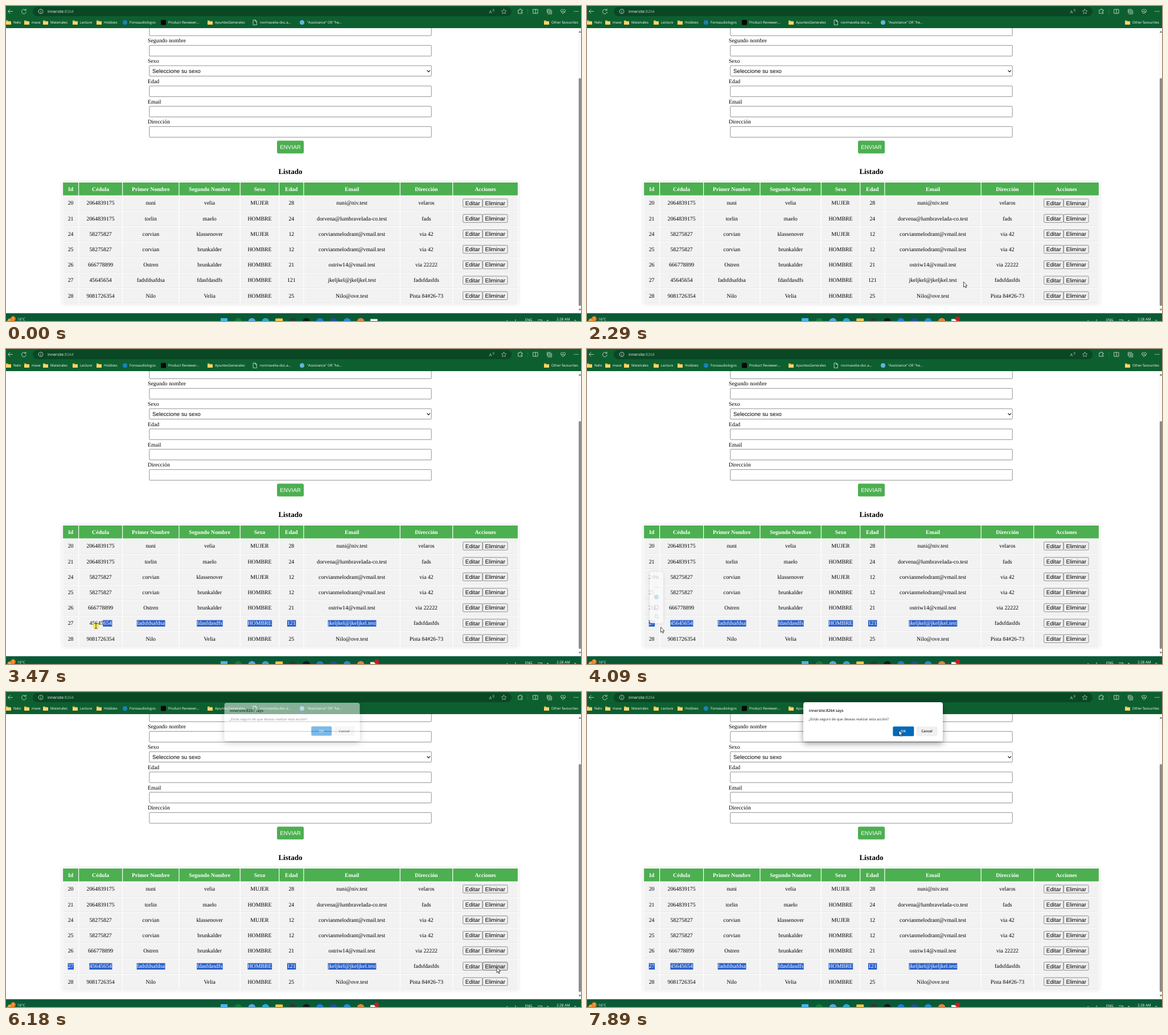
An HTML page for the animation above (8 s loop, 1010x555 px).

```html
<!DOCTYPE html>
<html lang="es">
<head>
<meta charset="utf-8">
<title>Listado</title>
<style>
html, body { margin: 0; width: 100%; height: 100%; overflow: hidden; background: #fff; }
svg { display: block; width: 1010px; height: 555px; text-rendering: geometricPrecision; }
.ui { font-family: "Open Sans", "Noto Sans", sans-serif; }
.serif { font-family: "Liberation Serif", "Times New Roman", serif; }
.sans { font-family: "Liberation Sans", Arial, sans-serif; }
text { white-space: pre; }
</style>
</head>
<body>
<svg id="stage" viewBox="0 0 1010 555"></svg>
<script>
const stage = document.getElementById('stage');

// Markup helpers
const rect = (x, y, w, h, fill, r = 0, more = '') =>
  `<rect x="${x}" y="${y}" width="${w}" height="${h}" rx="${r}" fill="${fill}" ${more}/>`;
const dot = (x, y, r, fill, more = '') => `<circle cx="${x}" cy="${y}" r="${r}" fill="${fill}" ${more}/>`;
const line = (d, color = '#d5e5da', w = .8) =>
  `<path d="${d}" fill="none" stroke="${color}" stroke-width="${w}" stroke-linecap="round" stroke-linejoin="round"/>`;
const text = (s, x, y, size, cls, fill = '#000', more = '') =>
  `<text x="${x}" y="${y}" font-size="${size}" class="${cls}" fill="${fill}" ${more}>${s}</text>`;
const mid = 'text-anchor="middle"', bold = 'font-weight="700"';
const outline = 'stroke="#767676" stroke-width=".8"';
const folder = (x, y = 29) =>
  `<path d="M${x} ${y - 3.4}h3.2l1.2 1.2h4.6v6h-9z" fill="#f2bd45"/>` + rect(x, y - 1.2, 9, 4.8, '#ffd76e', .6);

function toolbar() {
  let s = rect(0, 0, 1010, 39, '#0e5f30') + rect(47, 1.5, 841, 16.5, '#0a4725', 8);
  s += line('M11.5 9.5H3.5M7 6L3.5 9.5L7 13');
  s += line('M34.6 7.4A4 4 0 1 0 35.4 10.4M35 5.2V7.6H32.6');
  s += line('M57 9.5a4 4 0 1 0 8 0a4 4 0 1 0-8 0M61 9.2V11.6M61 7.4V7.5');
  s += text('innersite<tspan fill="#9fbfab">:8264</tspan>', 73, 12.1, 6.9, 'ui', '#fff');
  s += text('A', 848.5, 12.6, 7.5, 'ui', '#b9d0c1') + line('M855 6q1.4 1.5 0 3M856.6 5q2 2.5 0 5', '#b9d0c1', .6);
  s += line('M874.5 5.3l1.3 2.8 3.1.4-2.3 2.1.6 3-2.7-1.5-2.7 1.5.6-3-2.3-2.1 3.1-.4z', '#b9d0c1', .7);
  s += line('M900 7h2.2a1.4 1.4 0 1 1 2.6 0H907v2.2a1.4 1.4 0 1 0 0 2.4V13H900z');
  s += line('M916.5 5V14', '#3b7d56', .6);
  s += line('M926 6h8v7h-8zM930 6v7');
  s += line('M950.5 11.5V6h6M952.5 8h6v6h-6zM955.5 9.5v3M954 11h3');
  s += line('M974.5 9a2.2 2.2 0 0 1 4-1.8a2.2 2.2 0 0 1 4 1.8L978.5 13.5zM976 9.8h2l.8-1.2 1 2.2h2');
  for (const x of [998.5, 1001.5, 1004.5]) s += dot(x, 9.5, .75, '#e3eee7');
  const marks = [[0, 13, 'Nelo'], [32, 45, 'mave'], [65, 78, 'Materiales'], [117, 130, 'Lecture'],
    [159, 172, 'Hobbies'], [0, 217, 'Fonoaudiologos'], [0, 285, 'Product Reviewer...'],
    [354, 367, 'ApuntesGenerales'], [0, 446, 'normavelia-doc.a...'], [0, 529, '"Assistance" OR "he...'],
    [945, 958, 'Other favourites']];
  for (const [icon, x, name] of marks) {
    if (icon || x < 20) s += folder(icon);
    s += text(name, x, 31.2, 6.15, 'ui', '#fff');
  }
  s += dot(209, 29, 4, '#1681c4') + rect(272, 24.5, 9, 9, '#080808', 1) + dot(520, 29, 4, '#62b4dc');
  s += line('M434.5 24.8h3.5l2.3 2.3v6.2h-5.8zM438 24.8v2.3h2.3', '#fff', .7);
  return s;
}

function form() {
  let s = rect(251.8, 30, 495.4, 22.3, '#fff', 1, outline);
  ['Segundo nombre', 'Sexo', 'Edad', 'Email', 'Dirección'].forEach((label, i) => {
    const y = 69.4 + i * 35.75;
    s += text(label, 249, y - 5, 9.85, 'serif') + rect(251.8, y, 495.4, i == 1 ? 18.4 : 18.8, '#fff', 1, outline);
  });
  s += text('Seleccione su sexo', 257, 118.1, 9.85, 'sans') + line('M739.8 113.6l2.4 2.5 2.4-2.5', '#111', 1.2);
  s += rect(476, 237.3, 47, 22.4, '#4caf50', 2.5) + text('ENVIAR', 499.5, 251.6, 9.85, 'sans', '#fff', mid);
  return s + text('Listado', 499.5, 296.2, 13.1, 'serif', '#000', mid + bold);
}

const edges = [99.5, 127.6, 204.6, 304, 411.3, 479.7, 522.9, 692.2, 784.7, 899.5];
const heads = ['Id', 'Cédula', 'Primer Nombre', 'Segundo Nombre', 'Sexo', 'Edad', 'Email', 'Dirección', 'Acciones'];
const people = [
  '20|2064839175|nuni|velia|MUJER|28|nuni@niv.test|velaros',
  '21|2064839175|torlin|maelo|HOMBRE|24|dorvena@lumbravelada-co.test|fads',
  '24|58275827|corvian|klassenover|MUJER|12|corvianmelodrant@vmail.test|via 42',
  '25|58275827|corvian|brunkalder|HOMBRE|12|corvianmelodrant@vmail.test|via 42',
  '26|666778899|Ostren|brunkalder|HOMBRE|21|ostriw14@vmail.test|via 22222',
  '27|45645654|fadsfdsafdsa|fdasfdasdfs|HOMBRE|121|jkeljkel@jkeljkel.test|fadsfdasfds',
  '28|9081726354|Nilo|Velia|HOMBRE|25|Nilo@ove.test|Pista 84#26-73'
].map(row => row.split('|'));
const center = c => (edges[c] + edges[c + 1]) / 2;
const rowY = r => 347.2 + r * 27.2;
const picked = 5;

function table() {
  let s = rect(99, 310, 801, 215, '#fff', 0, 'filter="url(#tableShadow)"');
  heads.forEach((h, c) => {
    const x = edges[c] + .6, w = edges[c + 1] - edges[c] - 1.2;
    s += rect(x, 311, w, 22.7, '#4caf50') + text(h, center(c), 325.6, 9.85, 'serif', '#fff', mid + bold);
    people.forEach((row, r) => {
      const y = rowY(r);
      s += rect(x, y - 12.5, w, 26, '#f2f2f2') + rect(x, y + 12.9, w, .6, '#dedede');
      if (c < 8) s += text(row[c], center(c), y + 3.2, 9.85, 'serif', '#000', mid);
    });
  });
  people.forEach((_, r) => {
    const y = rowY(r);
    [['Editar', 802.6, 34.2], ['Eliminar', 837.4, 43.6]].forEach(([name, x, w]) => {
      s += rect(x, y - 7.2, w, 14.2, '#efefef', 1.5, `${outline} data-x="${x}" data-y="${y - 7.2}" data-w="${w}"`);
      s += text(name, x + w / 2, y + 3.3, 9.85, 'sans', '#000', mid);
    });
  });
  return s;
}

function taskbar() {
  let s = rect(0, 541.5, 1010, 14, '#0a5a36') + rect(0, 541.5, 1010, .7, '#1c6b48');
  s += dot(7, 555, 4.5, '#e9a13b') + dot(12.5, 551, 4.4, '#f07c22') + text('1', 12.5, 553.2, 6, 'ui', '#fff', mid);
  s += text('16°C', 20, 554.4, 6.2, 'ui', '#fff');
  s += rect(377, 550, 12, 8, '#45b4ee');
  const apps = ['#157a3c', '#5aa4e0', '#28a8cf', '', '#30363b', '#15181b', '#1d79d4', '#204f91', '#238bd2', '#e1843c'];
  apps.forEach((color, i) => {
    const x = 408 + i * 23.9;
    s += color ? dot(x, 556, 6.3, color) : rect(x - 6.5, 550.5, 13, 6, '#f3c84d', 1);
  });
  s += rect(640, 551.5, 12.5, 5, '#f4f4f4') + dot(651, 551, 4, '#c81e1e', 'id="badge"');
  s += line('M878 556l2.2-2 2.2 2M895 552.5v3M934.5 553h7v4M949 556l3-3v3M998.5 553.5q2-1.5 3 2', '#e3eee7', .8);
  s += text('ENG', 912, 555.2, 6.1, 'ui', '#fff') + text('2:28 AM', 967, 554.4, 6.25, 'ui', '#fff');
  return s;
}

function dialog() {
  let s = rect(380, 18, 245, 69, '#fff', 4, 'filter="url(#dialogShadow)"');
  s += text('innersite:8264 says', 389.8, 34.6, 6.6, 'ui', '#1b1b1b', 'font-weight="600"');
  s += text('¿Estás seguro de que deseas realizar esta acción?', 389.5, 50, 6.15, 'ui', '#2b2b2b');
  s += rect(537.3, 60.7, 37, 17, '#0078d4', 2, 'id="ok"') + text('OK', 555.7, 71.4, 6.1, 'ui', '#fff', mid + 'font-weight="600"');
  s += rect(578.6, 60.7, 37, 17, '#f0f0f0', 2) + text('Cancel', 597, 71.4, 6.1, 'ui', '#1b1b1b', mid + 'font-weight="600"');
  return s;
}

function miniMenu() {
  const grey = '#c3c6c9';
  return rect(110, 392.5, 24, 90.5, '#f9f9f9', 4, 'filter="url(#tableShadow)"') +
    line('M118 402q4-4 8 0q-4 4-8 0M118.5 398.5l7 7', grey) +
    [119, 122, 125].map(x => dot(x, 420, .7, grey)).join('') + dot(122, 437, 4, '#b9dff0') +
    line('M120 451.5h5v6.5h-5zM118.5 453v6.5h4.5', grey) +
    line('M119 471a2.6 2.6 0 1 0 5.2 0a2.6 2.6 0 1 0-5.2 0M123.6 473l2.4 2.6', grey);
}

const shadow = (id, dy, blur, alpha) => `<filter id="${id}" x="-20%" y="-50%" width="140%" height="220%">
  <feDropShadow dx="0" dy="${dy}" stdDeviation="${blur}" flood-opacity="${alpha}"/></filter>`;

stage.innerHTML = `<defs>${shadow('tableShadow', 0, 3, .12)}${shadow('dialogShadow', 4, 5.5, .38)}
  <clipPath id="selClip"><rect id="selBox" y="470" width="0" height="27"/></clipPath></defs>` +
  rect(0, 0, 1010, 555, '#fff') + form() + table() +
  '<g id="selection" clip-path="url(#selClip)"></g>' +
  rect(1004.5, 39, 5.5, 503, '#fafafa') + rect(1006, 127, 4, 401.5, '#8b8b8b', 2) +
  '<path d="M1005.8 47l2.2-3.6 2.2 3.6zM1005.8 533.5l2.2 3.6 2.2-3.6z" fill="#777"/>' +
  toolbar() + taskbar() +
  `<g id="mini">${miniMenu()}</g><g id="dialog">${dialog()}</g><g id="cursor">` +
  dot(0, 2, 5.6, '#f2e63a', 'id="press" opacity=".8"') +
  '<path id="arrow" d="M0 0V9.2L2.1 7.3L3.6 10.7L5.1 10L3.6 6.8H6.5Z" fill="#fff" stroke="#111" stroke-width=".75"/>' +
  `<g id="beam">${line('M-2 -2.8Q0 -3 0 -1.6Q0 -3 2 -2.8M0 -2V5.8M-2 6.6Q0 6.8 0 5.4Q0 6.8 2 6.6', '#222', .8)}</g></g>`;

const $ = id => document.getElementById(id);
const show = (id, on) => $(id).setAttribute('visibility', on ? 'visible' : 'hidden');

// White copy of the picked row, revealed by the selection clip
$('selection').innerHTML = people[picked].slice(0, 7).map((word, c) =>
  text(word, center(c), rowY(picked) + 3.2, 9.85, 'serif', '#fff', mid)).join('');
for (const word of [...$('selection').children]) {
  const w = word.getComputedTextLength();
  word.insertAdjacentHTML('beforebegin',
    rect(word.getAttribute('x') - w / 2, rowY(picked) - 5.5, w + .6, 11.4, '#2b60c9'));
}

const path = [[70, 994, 548], [470, 868, 442], [730, 868, 442], [1490, 598, 424], [1550, 601, 426],
  [2290, 661.5, 486], [2360, 660, 486], [2430, 651, 485], [3060, 256, 486], [3130, 212, 486],
  [3200, 205, 486], [3800, 101, 486], [3980, 101, 486], [4090, 128.5, 490], [4780, 843, 479],
  [4850, 847, 480], [4980, 862, 485.3], [6450, 862, 485.3], [6510, 722, 419.5], [7280, 598, 73],
  [7350, 595, 71], [7820, 548, 67.5], [8000, 548, 67.5]];

function cursorAt(t) {
  const i = Math.max(1, path.findIndex(p => p[0] >= t));
  const [t0, x0, y0] = path[i - 1], [t1, x1, y1] = path[i];
  let k = Math.max(0, (t - t0) / (t1 - t0));
  if (t1 - t0 > 650 && t0 != 4090) k = k * .6 + k * k * (3 - 2 * k) * .4;
  return [x0 + (x1 - x0) * k, y0 + (y1 - y0) * k];
}

const clamp = v => Math.min(1, Math.max(0, v));
const between = (t, a, b) => t >= a && t < b;
const buttons = [...stage.querySelectorAll('[data-x]')];
const dragStart = 2430, dragEnd = 4020;

function draw(t) {
  const [x, y] = cursorAt(t);
  const dragging = between(t, dragStart, dragEnd);
  const beam = dragging || between(t, 1350, 1650);
  const opened = clamp((t - 6080) / 200);

  show('badge', t >= 270);
  show('cursor', t >= 70);
  $('cursor').setAttribute('transform', `translate(${x} ${y})`);
  show('arrow', t >= 70 && !beam);
  show('beam', beam);
  show('press', dragging || between(t, 6040, 6150));

  // The highlight trails the pointer slightly
  const left = t < dragStart ? 652 : t > dragEnd ? 99 : Math.min(652, cursorAt(t - 70)[0]);
  $('selBox').setAttribute('x', left);
  $('selBox').setAttribute('width', 653 - left);

  $('mini').setAttribute('opacity', t < 4160 ? .88 * clamp((t - 4010) / 80) : .88 * clamp((4380 - t) / 220));
  $('dialog').setAttribute('opacity', opened);
  const zoom = .94 + .06 * opened;
  $('dialog').setAttribute('transform', `translate(502.5 52) scale(${zoom}) translate(-502.5 -52)`);
  $('ok').setAttribute('fill', t > 7300 && x < 574 ? '#0069ba' : '#0078d4');

  for (const b of buttons) {
    const { x: bx, y: by, w } = b.dataset;
    const over = t >= 70 && t < 6300 && x >= +bx && x <= +bx + +w && y >= +by && y <= +by + 14.2;
    b.setAttribute('fill', over ? '#e3e3e3' : '#efefef');
    b.setAttribute('stroke', over ? '#4f4f4f' : '#767676');
  }
}

const start = performance.now();
function tick() {
  draw((performance.now() - start) % 8000);
  requestAnimationFrame(tick);
}
tick();
</script>
</body>
</html>
```
